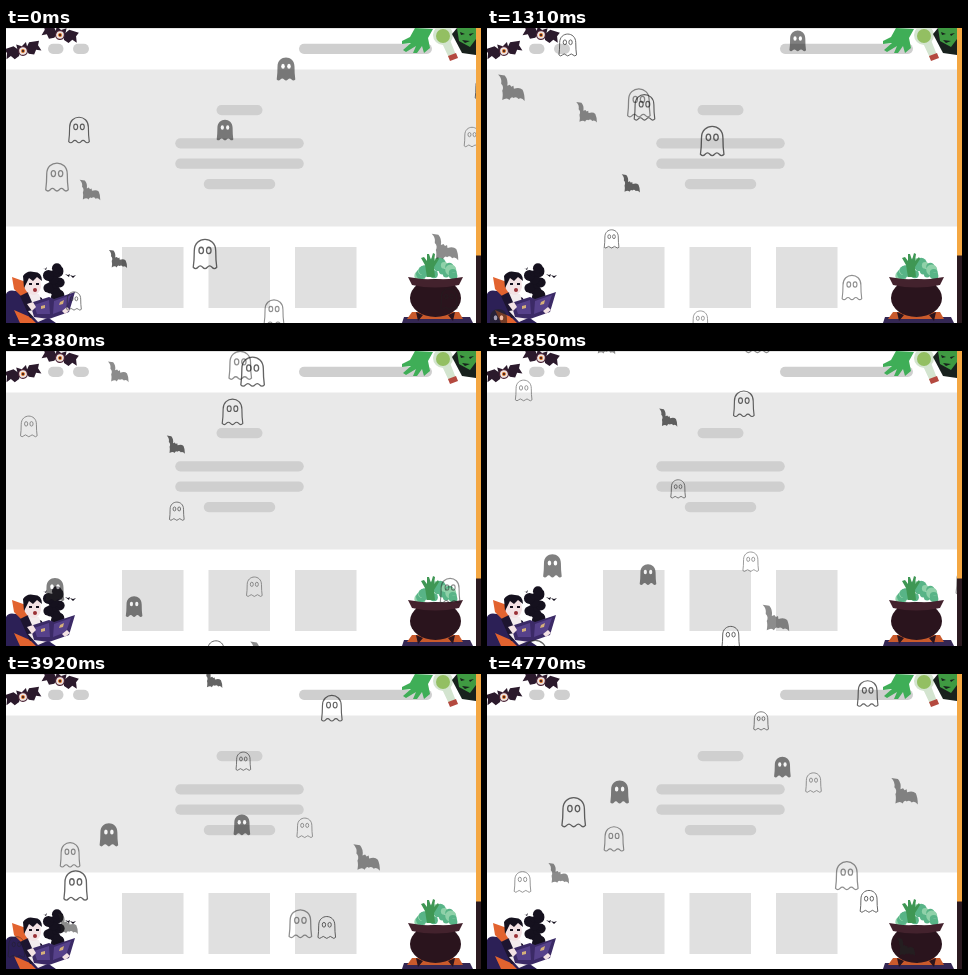
These frames come from a looping animation (475 by 295 pixels, 4.85 s). An HTML page:

```html
<!DOCTYPE html>
<html lang="en">
<head>
<meta charset="utf-8">
<title>Haunted page</title>
<style>
  html, body { margin: 0; width: 100%; height: 100%; overflow: hidden; background: #fff; }
  svg { display: block; width: 475px; height: 295px; }
</style>
</head>
<body>
<svg viewBox="0 0 475 295" xmlns="http://www.w3.org/2000/svg">
  <defs>
    <path id="body" d="M-11.500 13Q-10.500 6-10.500-3C-10.500-18 10.500-18 10.500-3Q10.500 6 11.500 13q-2.300 2.600-4.600 0t-4.600 0-4.600 0-4.600 0-4.600 0z"/>
    <g id="eyes"><ellipse cx="-3.700" cy="-3.500" rx="2.200" ry="3.100"/><ellipse cx="3.700" cy="-3.500" rx="2.200" ry="3.100"/></g>
    <g id="outline" fill="none" stroke="#222" stroke-width="1.300"><use href="#body"/><use href="#eyes"/></g>
    <g id="solid"><use href="#body" fill="#222"/><use href="#eyes" fill="#fff"/></g>
    <path id="bat" fill="#222" d="M-13-13L-6.500-12Q-3-8-4-2L-1.500-3L0-1L2-2L2.500 1Q8-1 11 2Q13 6 13 13Q10 9 7 11Q5 8 2 10Q0 8-2 12Q-4 9-9 12Q-8 6-9 3Q-7-1-10-4Q-9-9-13-13Z"/>
    <g id="wing" fill="#2b1a2c"><path d="M3-1L8-7L18-6L16-2L18 4L13 2L10 6L5 4Z"/><path d="M0-5L5-8L5-1Z"/></g>
    <g id="eyebat">
      <use href="#wing"/><use href="#wing" transform="scale(-1 1)"/>
      <circle r="5" fill="#4a2538"/><circle r="3.800" fill="#f1e4df"/>
      <circle r="2" fill="#d9772f"/><circle r="1" fill="#24121c"/>
    </g>
  </defs>

  <path fill="#e4e4e4" d="M0 0H470V1H0Z"/>
  <path fill="#e9e9e9" d="M0 41.500H470V198.500H0Z"/>
  <g id="blocks"></g>

  <use href="#eyebat" transform="translate(17 23) rotate(-14)"/>
  <use href="#eyebat" transform="translate(54 7) rotate(12)"/>

  <!-- hand, flask and zombie -->
  <g>
    <path fill="#3fae57" d="M409 0L427 1L422 10L424 20L418 25L416 18L411 25L407 25L410 18L400 24L397 22L405 15L396 16L396 13L404 9Z"/>
    <path fill="#d3e4cf" d="M436 15L444 12L450 27L443 30Z"/>
    <circle cx="437" cy="7" r="10" fill="#d3e4cf"/>
    <circle cx="437" cy="8" r="7" fill="#93bf62"/>
    <path fill="#b4493f" d="M442 28L450 25L452 30L444 33Z"/>
    <path fill="#18211d" d="M446 6L451 0H470V27L456 25Z"/>
    <path fill="#3f9a42" d="M451 0H470V11L464 19L453 13Z"/>
    <path fill="#18211d" d="M454 4l5 2-4 1zM463 6l5-1-4 3zM456 12l8 1-5 2z"/>
  </g>

  <!-- vampire with book -->
  <g>
    <path fill="#2c2056" d="M0 266Q2 261 10 263Q20 264 28 280L50 295H0Z"/>
    <path fill="#e2632f" d="M6 249L20 254L24 267L18 271L8 261ZM8 282L24 289L30 295H14Z"/>
    <path fill="#1d1530" d="M14 268L22 264L36 270L40 286L24 290Z"/>
    <path fill="#f3ecee" d="M22 265L33 266L36 277L29 281ZM22 283L40 280L46 288L32 294Z"/>
    <path fill="#f3e2e4" d="M19 248Q27 243 34 249L35 259Q33 267 27 267Q19 265 18 257Z"/>
    <path fill="#15111e" d="M18 260L17 248Q21 242 28 244Q36 244 36 253L31 249L27 253L23 250Z"/>
    <path fill="#15111e" d="M23 255h3v2h-3zM30 255h3v2h-3z"/>
    <circle cx="29" cy="262" r="2" fill="#9a2f35"/>
    <g id="smoke" fill="#15111e"></g>
    <path fill="#15111e" d="M59 246l3 1 2-1-1 3zM64 247l3 1 3-1-3 3zM37 240l2 1 2-2-1 3z"/>
    <path fill="#3b2a66" d="M24 275L43 269L48 271L69 264L63 284L43 291L28 289Z"/>
    <path fill="#56418a" d="M28 277L43 272L44 286L31 286ZM48 273L65 267L60 281L47 286Z"/>
    <path fill="#d6b17a" d="M35 278l4-1 0 3-4 1zM54 274l4-2-1 4-4 1z"/>
    <path fill="#f3e2e4" d="M21 276l6-2 3 5-4 4zM56 283l5-4 3 3-5 4z"/>
  </g>

  <!-- cauldron -->
  <g>
    <path fill="#342753" d="M398 289H464L467 295H396Z"/>
    <path fill="#c95a2c" d="M401 291L406 284H453L457 291Z"/>
    <g id="steam" fill="#58b487"></g>
    <path fill="#3f9754" d="M421 249L419 237L415 230L418 229L421 233L421 226L423 226L425 232L427 225L429 226L428 233L432 229L433 231L428 239L429 249Z"/>
    <ellipse cx="429.500" cy="270" rx="25.500" ry="19" fill="#2a141d"/>
    <path fill="#2a141d" d="M408 253H451L447 262H412ZM410 284L417 287L412 293ZM449 284L442 287L447 293Z"/>
    <path fill="#43222d" d="M402 249Q429 254 457 249L453 257Q429 262 406 257Z"/>
  </g>

  <g id="flock"></g>
  <path fill="#f4a742" d="M470 0H475V228H470Z"/>
  <path fill="#2b1a20" d="M470 227.500H475V295H470Z"/>
</svg>
<script>
const NS = 'http://www.w3.org/2000/svg';
const W = 470, H = 295, FPS = 13, LOOP = 4850;

function add(parent, tag, attrs) {
  const el = document.createElementNS(NS, tag);
  for (const k in attrs) el.setAttribute(k, attrs[k]);
  return document.getElementById(parent).appendChild(el);
}

const pill = (x, y, width) =>
  add('blocks', 'rect', { x, y, width, height: 10.2, rx: 5.1, fill: '#cfcfcf' });
const line = (y, width) => pill(233.5 - width / 2, y, width);

pill(42, 15.7, 15.5);
pill(67, 15.7, 16);
pill(293, 15.7, 133);
line(77, 46);
[128.5, 128.5, 71.5].forEach((width, i) => line(110.2 + 20.4 * i, width));
for (let i = 0; i < 3; i++)
  add('blocks', 'rect', { x: 116 + 86.5 * i, y: 219, width: 61.5, height: 61, fill: '#e0e0e0' });

let seed = 7;
const rand = () => (seed = seed * 16807 % 2147483647) / 2147483647;

for (let i = 0; i < 17; i++)
  add('smoke', 'circle', {
    cx: 48 + 6 * Math.sin(i * 0.95), cy: 269 - 1.8 * i, r: 3 + 2.5 * Math.sin(i * 1.7) ** 2
  });
for (let i = 0; i < 26; i++) {
  const a = Math.PI * i / 25;
  add('steam', 'circle', {
    cx: 431 - 17 * Math.cos(a), cy: 248 - 14 * Math.sin(a) * rand(), r: 2 + 4 * rand(),
    fill: i % 4 ? '#58b487' : '#8fd1a9'
  });
}

// Each sprite: x, y, vx, vy (px/s), size, then where it comes back after each exit.
const looks = [
  { shape: 'outline', opacity: 0.5, sprites: [
    [51, 149, 77, -56.6, 23, 214],
    [268, 284, 74, -18.7, 20, 200],
    [466, 109, 32.7, -53.2, 16, 26, 206],
    [443, 271, 29.5, -76.5, 17, 161, -2]] },
  { shape: 'bat', opacity: 0.52, sprites: [
    [84, 162, 11.9, -59.3, 21, 50],
    [439, 219, 67, -78, 27, 107, 251]] },
  { shape: 'solid', opacity: 0.57, sprites: [
    [280, 41, 35, -50.5, 19, 2],
    [219, 102, 70, -68, 17, 77]] },
  { shape: 'outline', opacity: 0.7, sprites: [
    [73, 102, 64.5, -17.3, 21],
    [199, 226, 20, -86.3, 24, 47],
    [68, 273, 43.2, -47.4, 15],
    [478, 60, 72, -30.7, 18, 56, 198]] },
  { shape: 'bat', opacity: 0.7, sprites: [
    [112, 231, 24.3, -57.7, 18.5, 405]] }
];

const flock = looks.flatMap(({ shape, opacity, sprites }) =>
  sprites.map(([x, y, vx, vy, size, ...returns]) => ({
    el: add('flock', 'use', { href: '#' + shape, opacity }),
    scale: size / (shape === 'bat' ? 26.5 : 23.5),
    r: size * 0.6, x, y, vx, vy, returns
  })));

// Straight flight; leaving the top re-enters at the bottom, leaving right re-enters left.
function position({ x, y, vx, vy, r, returns }, t) {
  for (const place of returns) {
    const top = (y + r) / -vy, right = (W + r - x) / vx;
    const exit = Math.min(top, right);
    if (exit > t) break;
    t -= exit;
    [x, y] = top < right ? [place, H + r] : [-r, place];
  }
  return [x + vx * t, y + vy * t];
}

const tickTime = k => Math.round(k * 100 / FPS) * 10;

function stepped(ms) {
  let k = Math.ceil(ms * FPS / 1000) + 1;
  while (tickTime(k) > ms) k--;
  return tickTime(k) / 1000;
}

function draw(now) {
  const t = stepped(now % LOOP);
  for (const p of flock) {
    const [x, y] = position(p, t);
    p.el.setAttribute('transform', `translate(${x} ${y}) scale(${p.scale})`);
  }
}

let origin;
function frame(now) {
  origin ??= now;
  draw(Math.max(0, now - origin));
  requestAnimationFrame(frame);
}
draw(0);
requestAnimationFrame(frame);
</script>
</body>
</html>
```
